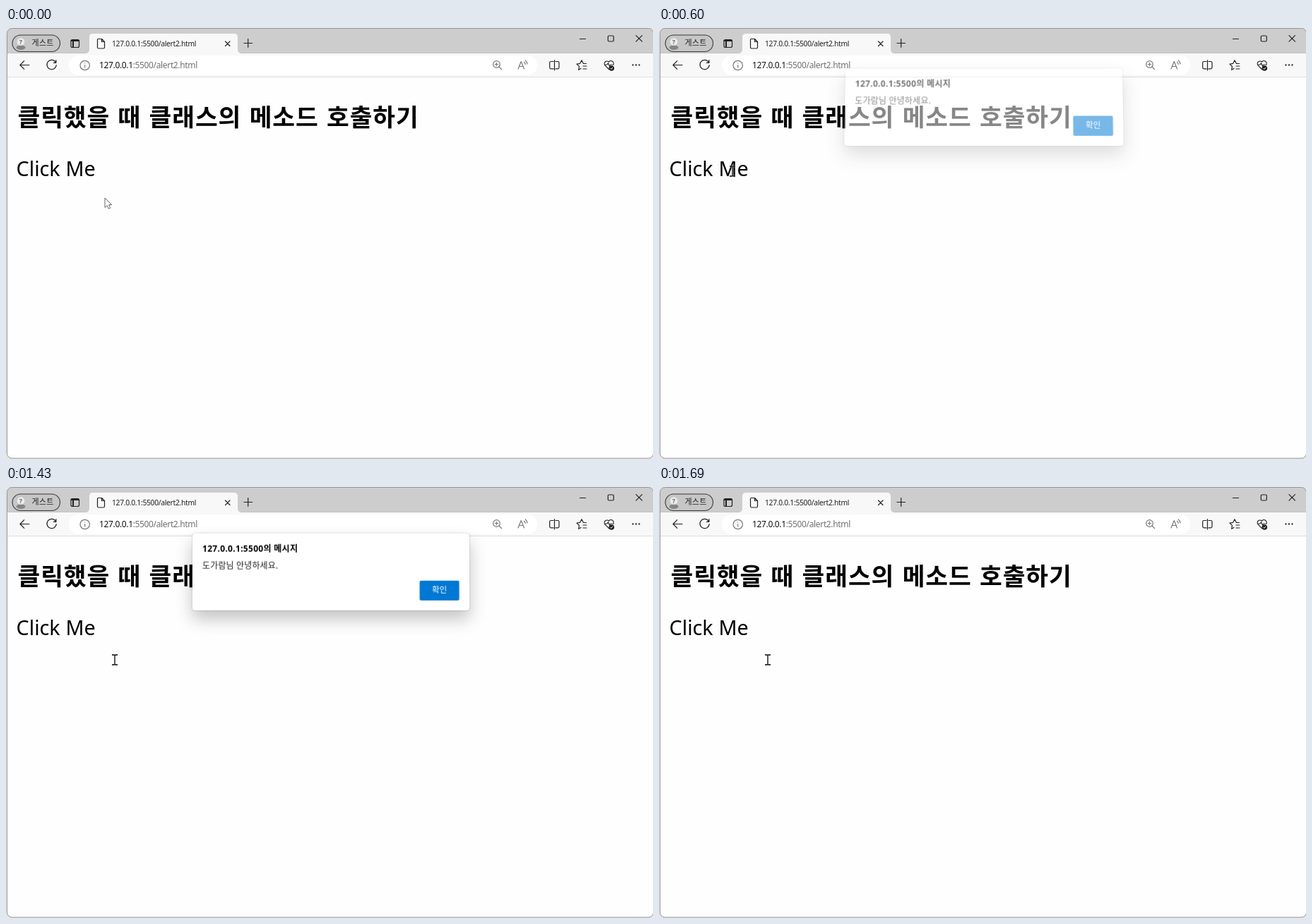
Recreate the animation shown at these times as an HTML page. Size 916 px wide and 611 px high, loop 2.48 s.

```html
<!DOCTYPE html>
<html lang="ko">
<head>
<meta charset="utf-8">
<title>Alert dialog</title>
<style>
html, body { margin: 0; width: 100%; height: 100%; overflow: hidden; background: #fefefe; }
body { position: relative; }
svg { position: absolute; left: 0; top: 0; overflow: visible; }
text { font-family: "Noto Sans", "Noto Sans CJK KR", "Noto Sans CJK", sans-serif; white-space: pre; }
.icon { fill: none; stroke: #222; stroke-width: 1.2; stroke-linecap: round; stroke-linejoin: round; }
.dim { stroke: #777; }
.heading { font: 700 34.5px "Noto Sans CJK KR", "Noto Sans CJK", sans-serif; letter-spacing: .9px; word-spacing: .9px; }
.link { font: 400 28.7px "Noto Sans", sans-serif; word-spacing: .5px; }

.dialog {
  --k: 1;
  position: absolute; left: 263.5px; top: 67px; width: 391.5px; height: 109px;
  border-radius: 4px; background: #fff; opacity: 0;
  box-shadow: 0 0 2px rgba(0,0,0,.32), 0 12px 24px rgba(0,0,0,.24);
  transform-origin: 50% 0;
  transform: translateY(calc(var(--k) * -16px)) perspective(1000px) rotateX(calc(var(--k) * 8.5deg));
  animation: dialog 2480ms step-end infinite;
}
.arrow { animation: arrow 2480ms step-end infinite; }
.beam { animation: beam 2480ms step-end infinite; }
.press { animation: press 2480ms step-end infinite; }

@keyframes dialog {
  0% { --k: 1; opacity: 0; }
  21.774% { --k: .92; opacity: .12; }
  24.193% { --k: .6; opacity: .53; }
  27.016% { --k: .25; opacity: .87; }
  29.838% { --k: .1; opacity: .98; }
  32.661% { --k: .03; opacity: 1; }
  35.483% { --k: 0; opacity: 1; }
  57.661% { --k: .08; opacity: 1; }
  60.08% { --k: .27; opacity: .9; }
  62.5% { --k: .57; opacity: .66; }
  64.516% { --k: .83; opacity: .33; }
  68.145%, 100% { --k: 1; opacity: 0; }
}
@keyframes arrow {
  0% { transform: translate(140px, 241px); opacity: 1; }
  8.064% { transform: translate(129px, 231px); opacity: 1; }
  10.887%, 100% { transform: translate(129px, 231px); opacity: 0; }
}
@keyframes beam {
  0% { transform: translate(108px, 207px); opacity: 0; }
  10.887% { transform: translate(108px, 207px); opacity: 1; }
  13.306% { transform: translate(104px, 203px); opacity: 1; }
  29.838% { transform: translate(118px, 214px); opacity: 1; }
  32.661% { transform: translate(142px, 236px); opacity: 1; }
  35.483%, 100% { transform: translate(154px, 245px); opacity: 1; }
}
@keyframes press {
  0% { opacity: 0; }
  16.129% { opacity: 1; }
  21.774%, 100% { opacity: 0; }
}
</style>
</head>
<body>
<svg width="916" height="611" viewBox="0 0 916 611">
  <!-- window frame -->
  <rect width="916" height="611" fill="#e6e6e6"/>
  <rect x="1.5" y=".5" width="915" height="609.5" rx="7" fill="#fefefe"/>
  <path d="M1.5 36V7.5a7 7 0 0 1 7-7H909.5a7 7 0 0 1 7 7V36Z" fill="#cdcdcd"/>
  <rect x="2" y="36" width="914" height="33" fill="#f8f8f8"/>
  <path d="M2 35.5H916" stroke="#c2c2c2"/>
  <path d="M2 69.5H916" stroke="#dedede"/>
  <path d="M112 36q6 0 6-6V13q0-5 5-5H323q5 0 5 5V30q0 6 6 6Z" fill="#f8f8f8"/>
  <rect x="89" y="39" width="663" height="28" rx="14" fill="#fff"/>
  <rect x="1.5" y=".5" width="915" height="609.5" rx="7" fill="none" stroke="#969696"/>

  <!-- profile and tab strip -->
  <rect x="9" y="10" width="67.5" height="23.5" rx="11.7" fill="#c6c6c6" stroke="#3a3a3a" stroke-width="1.1"/>
  <path d="M14.5 28.5q0-4 6.5-4t6.5 4q-2.5 2.5-6.5 2.5t-6.5-2.5Z" fill="#858585"/>
  <circle cx="21" cy="19.5" r="5.3" fill="#ececec"/>
  <text x="21" y="23" font-size="9" font-weight="700" text-anchor="middle" fill="#666">?</text>
  <text x="36.5" y="25" font-size="11" letter-spacing=".2" fill="#222">게스트</text>
  <g class="icon">
    <rect x="92" y="16.5" width="11.5" height="11" rx="2"/>
    <path d="M92.5 18H103M95 19V27" stroke-width="2"/>
    <path d="M130.5 15.5H135.5L139.5 19.5V27.5q0 1.5-1.5 1.5H131q-1.5 0-1.5-1.5V16.5q0-1 1-1ZM135.5 15.5V19.5H139.5"/>
    <path d="M310.5 19L317 25.5M317 19L310.5 25.5"/>
    <path d="M337 21.5H348.5M342.7 15.7V27.3"/>
    <path d="M812.5 15.5H820.5M892 10.7L900.5 19.2M900.5 10.7L892 19.2"/>
    <rect x="852.3" y="11" width="8" height="8" rx="1.5"/>
  </g>
  <text x="150" y="25.5" font-size="10.3" letter-spacing="-.3" fill="#222">127.0.0.1:5500/alert2.html</text>

  <!-- toolbar -->
  <g class="icon">
    <path d="M33 52.5H20M25.7 46.7L19.9 52.5L25.7 58.3"/>
    <path d="M70.5 49A6.6 6.6 0 1 0 71.2 52.5M70.9 45.7V49.3H67.3"/>
    <g class="dim">
      <circle cx="111.7" cy="53" r="6.7"/>
      <path d="M111.7 52.5V56M111.7 49.8V50"/>
      <circle cx="694.5" cy="51.5" r="4.8"/>
      <path d="M698 55L701.5 58.5M692.3 51.5H696.7M694.5 49.3V53.7"/>
      <path d="M725 58L729.3 47.5L733.6 58M726.5 54.5H732.1M733.5 48.3q1.7 1.2 1.7 3.2M735.3 46q2.5 1.8 2.7 5"/>
    </g>
    <path d="M775 47.5H771.5q-1.8 0-1.8 1.8V56q0 1.8 1.8 1.8H775M778 47.5H781.2q1.8 0 1.8 1.8V56q0 1.8-1.8 1.8H778M776.5 45.5V60"/>
    <path d="M821.5 50.5H817.5L815 45.7L812.7 50.3L808 51L811.5 54.4L810.7 59.3L814 57.5M817 54H822M817 58H822"/>
    <path d="M853.5 58.5L848.2 53.2a3.6 3.6 0 0 1 5.3-5a3.6 3.6 0 0 1 6 4.2M847.8 52H851L852.5 49.8L854.5 54L856 52H858"/>
  </g>
  <circle cx="857.3" cy="57" r="3.8" fill="#222"/>
  <path d="M855.5 57L856.8 58.3L859.2 55.8" fill="none" stroke="#fff"/>
  <g fill="#222"><circle cx="887.5" cy="52.5" r="1.15"/><circle cx="892" cy="52.5" r="1.15"/><circle cx="896.5" cy="52.5" r="1.15"/></g>
  <text x="132" y="57" font-size="12" letter-spacing="-.35" fill="#111">127.0.0.1<tspan fill="#707070">:5500/alert2.html</tspan></text>

  <!-- page -->
  <text class="heading" x="16.5" y="138.5">클릭했을 때 클래스의 메소드 호출하기</text>
  <text class="link" x="14.6" y="209.5">Click Me</text>
</svg>

<div class="dialog">
  <svg width="391.5" height="109" viewBox="263.5 67 391.5 109">
    <text x="277.5" y="93" font-size="12" font-weight="700" letter-spacing=".3">127.0.0.1:5500의 메시지</text>
    <text x="277.5" y="117" font-size="12" letter-spacing=".15" fill="#222">도가람님 안녕하세요.</text>
    <rect x="585" y="134" width="56" height="28" rx="2" fill="#0078d4"/>
    <text x="613" y="151" font-size="11.5" text-anchor="middle" fill="#fff">확인</text>
  </svg>
</div>

<svg width="916" height="611" viewBox="0 0 916 611">
  <circle class="press" cx="102" cy="203" r="10.5" fill="#f5ec20" fill-opacity=".75"/>
  <path class="arrow" d="M0 0V13.5L3.2 10.6L5.4 15.3L7.7 14.2L5.6 9.7H9.7Z" fill="#fff" stroke="#555" stroke-width=".9"/>
  <g class="beam" fill="none">
    <path d="M-4-7H4M0-7V7M-4 7H4" stroke="#fff" stroke-width="2.6" stroke-opacity=".7"/>
    <path d="M-4-7H-1L0-6.5L1-7H4M0-6.5V6.5M-4 7H-1L0 6.5L1 7H4" stroke="#000" stroke-width="1.3"/>
  </g>
</svg>
</body>
</html>
```
